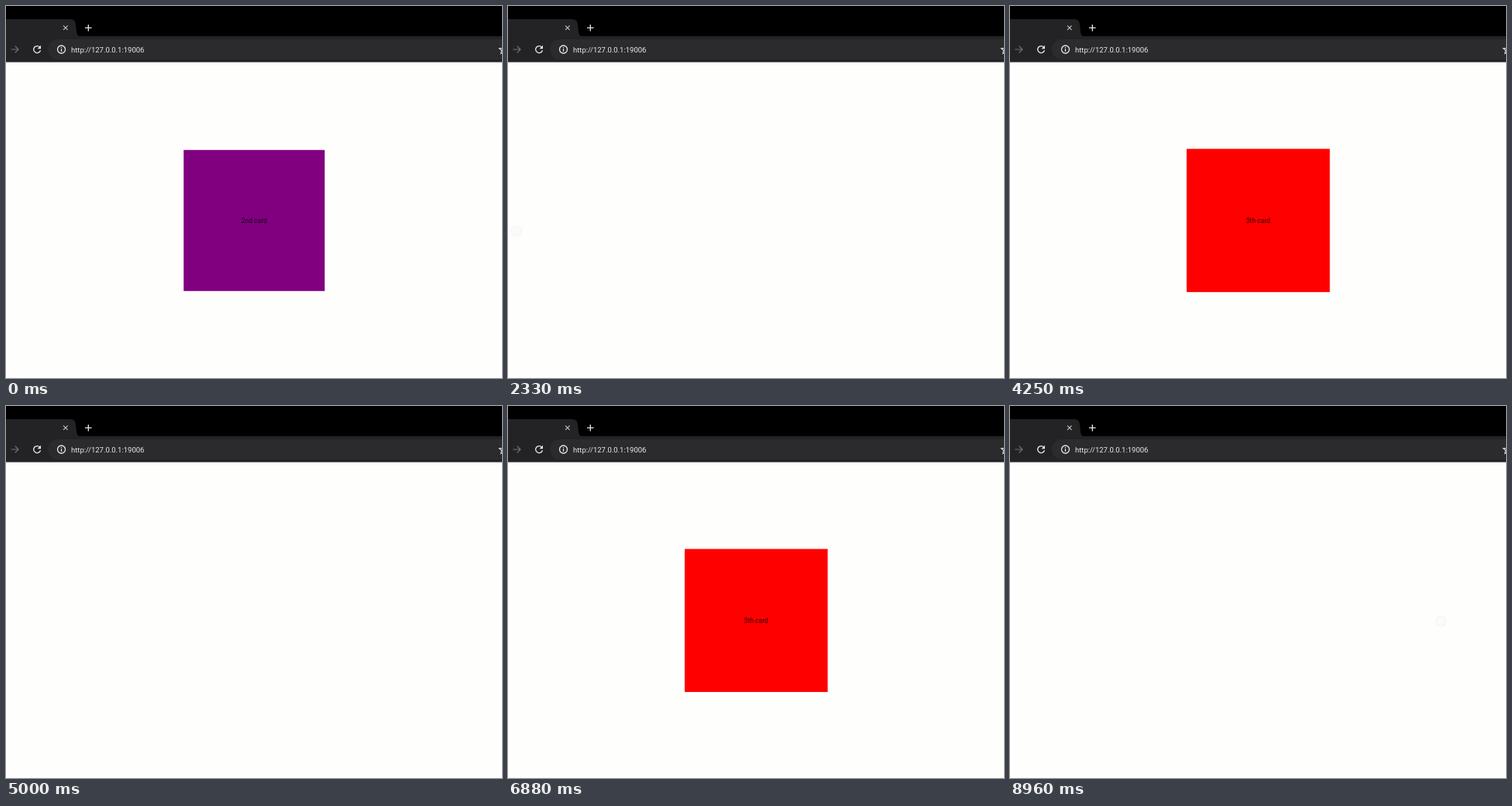
An HTML page that plays this animation: 640x480 px, repeating every 9000 ms.

```html
<!DOCTYPE html>
<html lang="en">
<head>
<meta charset="utf-8">
<title>Swipe cards</title>
<style>
  html, body { margin: 0; width: 100%; height: 100%; overflow: hidden; background: #fefefd; }
  svg { display: block; width: 640px; height: 480px; }
  text { font-family: Roboto, Arial, sans-serif; }
  .icon { fill: none; stroke: #e8eaed; stroke-width: 1.3; }
  .bar { fill: #232326; }
</style>
</head>
<body>
<svg viewBox="0 0 640 480">
  <rect width="640" height="480" fill="#fefefd"/>

  <g id="card">
    <rect id="face" x="-91" y="-91" width="182" height="182"/>
    <text id="label" y="3" font-size="8.5" text-anchor="middle" fill="#000" fill-opacity=".85"></text>
  </g>

  <circle id="touch" r="6.6" fill="#fafafa" fill-opacity=".7" stroke="#ececf0" stroke-opacity=".55" stroke-width="1.2"/>

  <!-- browser bar -->
  <rect width="640" height="40" fill="#000"/>
  <path class="bar" d="M0 17H83Q89.5 17 90 24L91 33Q91.5 39 96 39.5H0Z"/>
  <rect class="bar" y="39" width="640" height="33.5"/>
  <rect x="54" y="43" width="620" height="26" rx="13" fill="#2b2b2d"/>
  <path class="icon" d="M74 25.3l5.600 5.600m0-5.600l-5.600 5.600" style="stroke:#c4c5c8;stroke-width:1.1"/>
  <path class="icon" d="M102 28.2h8.600m-4.300-4.300v8.600"/>
  <path class="icon" d="M6.500 56H16m-4.300-4.400L16 56l-4.300 4.400" style="stroke:#737478;stroke-width:1.2"/>
  <path class="icon" d="M43.600 53.100A4.500 4.500 0 1 0 44.500 57.300"/>
  <path d="M45 50.800V55.200H40.600Z" fill="#e8eaed"/>
  <circle class="icon" cx="71.5" cy="56" r="5"/>
  <path class="icon" d="M71.500 55.300v3.500M71.500 52.900v1.300"/>
  <text x="84" y="59.6" font-size="9.5" fill="#e8eaed">http://127.0.0.1:19006</text>
  <path id="star" class="icon" style="stroke-width:1.1"/>
</svg>

<script>
const LOOP = 9000;
const HOME = { x: 320.25, y: 276.75 };
const TURN = 0.2455;   // degrees per dragged pixel
const FADE = 240;      // drag distance at which a card is gone
const REACH = 262;     // full length of a swipe

const kinds = {
  first:  ['#ffa500', '1st card'],
  second: ['#800080', '2nd card'],
  third:  ['#008000', '3rd card'],
  fourth: ['#0000ff', '4th card'],
  fifth:  ['#ff0000', '5th card']
};

// born: pop-in starts, grab/out: drag starts/ends, lag: slow start,
// sway: swing the other way first, lift: height of the arc
const base = { side: -1, lag: 1, sway: 0, lift: 20, press: [266, 292] };
const turns = [
  { kind: 'second', born: -2000, grab: 30, out: 1180, lag: 4.4 },
  { kind: 'third', born: 1250, grab: 1870, out: 2380 },
  { kind: 'fourth', born: 2470, grab: 3240, out: 3700, lift: 28, press: [262.5, 291] },
  { kind: 'fifth', born: 3860, grab: 4320, out: 4990, side: 1, lag: 1.5, sway: 130 },
  { kind: 'fourth', born: 5150, grab: 5780, out: 6320, lag: 1.72, lift: 16, press: [271, 294] },
  { kind: 'fifth', born: 6480, grab: 7060, out: 7580 },
  { kind: 'first', born: 7652, grab: 8560, out: LOOP, side: 1, press: [300, 279] }
].map(turn => ({ ...base, ...turn }));

const el = id => document.getElementById(id);
const card = el('card'), face = el('face'), label = el('label'), touch = el('touch');

const smooth = u => u * u * (3 - 2 * u);

// Damped spring from 0 to 1 with a slight overshoot
function spring(ms) {
  const t = ms / 1000, decay = 11.76, freq = 9.59;
  return 1 - Math.exp(-decay * t) * (Math.cos(freq * t) + decay / freq * Math.sin(freq * t));
}

function drag(turn, t) {
  const u = Math.max(0, (t - turn.grab) / (turn.out - turn.grab));
  const dx = turn.side * (REACH * smooth(u ** turn.lag) - turn.sway * Math.sin(Math.PI * u));
  return [dx, -turn.lift * Math.sin(Math.PI * Math.abs(dx) / REACH)];
}

function draw(t) {
  const turn = turns.find(c => t >= c.born && t < c.out);
  const held = turn && t >= turn.grab;
  card.style.display = turn ? '' : 'none';
  touch.style.display = held ? '' : 'none';
  if (!turn) return;

  const [dx, dy] = drag(turn, t);
  const [color, name] = kinds[turn.kind];
  face.setAttribute('fill', color);
  label.textContent = name;
  card.setAttribute('opacity', Math.max(0, 1 - Math.abs(dx) / FADE));
  card.setAttribute('transform',
    `translate(${HOME.x + dx} ${HOME.y + dy}) rotate(${dx * TURN}) scale(${spring(t - turn.born)})`);
  touch.setAttribute('transform', `translate(${turn.press[0] + dx} ${turn.press[1] + dy})`);
}

const points = Array.from({ length: 10 }, (_, i) => {
  const r = i % 2 ? 2.5 : 5.8, a = i * Math.PI / 5;
  return `${642 + r * Math.sin(a)} ${56.5 - r * Math.cos(a)}`;
});
el('star').setAttribute('d', `M${points.join('L')}Z`);

const begin = performance.now();
function frame() {
  draw((performance.now() - begin) % LOOP);
  requestAnimationFrame(frame);
}
draw(0);
requestAnimationFrame(frame);
</script>
</body>
</html>
```
